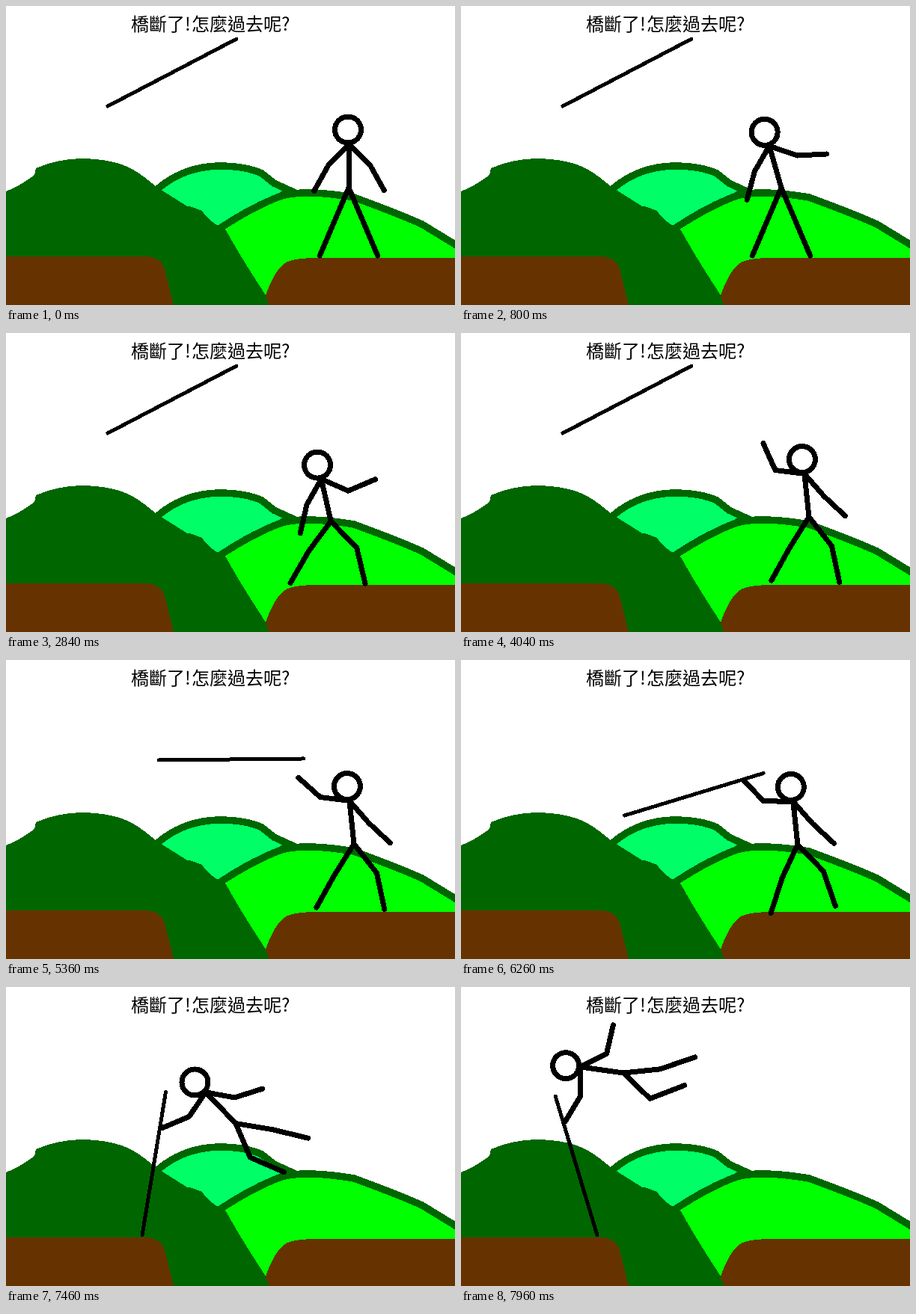
An HTML page for the animation above (8 s loop, 600 px wide and 400 px high).

```html
<!DOCTYPE html>
<html lang="zh-Hant">
<head>
<meta charset="utf-8">
<style>
  html, body { margin: 0; width: 100%; height: 100%; overflow: hidden; background: #fff; }
  svg { display: block; width: 600px; height: 400px; shape-rendering: crispEdges; }
  text { font: 100 24px "Noto Sans CJK TC", "Noto Sans CJK", sans-serif; }
  .line { fill: none; stroke: #000; stroke-width: 7; stroke-linecap: round; stroke-linejoin: round; }
  .hill { stroke: #060; stroke-width: 9.5; }
</style>
</head>
<body>
<svg viewBox="0 0 600 400">
  <path class="hill" fill="#0f6" d="M200 247Q235 215 285 214Q320 214 342 224L358 237 380 247 284 300Z"/>
  <path class="hill" fill="#0f0" d="M285 298Q330 268 368 254Q400 245 465 256Q525 278 556 292L610 325V410H285Z"/>
  <path fill="#060" d="M0 248Q20 240 38 226L40 217Q70 204 103 204Q140 205 162 215Q190 228 225 266L246 268 262 274Q270 288 294 300Q310 330 347 387L352 400H0Z"/>
  <path fill="#630" d="M0 335H188Q208 337 212 352L224 400H0ZM351 400L347 387Q360 350 376 342Q390 337 415 337H600V400Z"/>
  <text x="167" y="33">橋斷了!</text>
  <text x="248" y="33">怎麼過去呢?</text>
  <path id="pole" class="line" style="stroke-width:5"/>
  <path id="limbs" class="line"/>
  <circle id="head" class="line" r="17.5"/>
</svg>
<script>
const LOOP = 8000, POLE = 194, TORSO = 58, NECK = 19.5, ARM = 39.3, LEG = 49.4;
const RAISED = 3740, LEVEL = 5360, GRIP = 6060;

// Beckoning forearm.
const wave = t => 226 + 42 * Math.sin((t - 3925) / 232);

// Time, hip x, y, then angles clockwise from the right:
// torso, left leg, right leg, right arm, left arm (upper and lower parts)
const call = [465, 246, -96, 122, 119, 52, 78, 49, 43, 187];
const poses = [
  [0, 458, 243, -90, 113, 113, 67, 67, 44, 61, 134, 119],
  [800, 428, 243, -106, 113, 113, 67, 67, 19, -3, 120, 105],
  [2020, 392, 260, -112, 133, 121, 37, 75, -4, -138, 112, 96],
  [3440, 465, 246, -96, 122, 119, 52, 78, 44, 61, 125, 108],
  [RAISED, ...call, wave(RAISED)],
  [GRIP, ...call, wave(GRIP)],
  [6960, 397, 250, -96, 90, 68, 25, 46, 48, 42, 158, 193],
  [7960, 217, 115, -172, 44, -21, -6, -19, -27, -77, 90, 121]
];

// Lower end of the pole: time, x, y
const tips = [
  [0, 136, 134], [4340, 136, 134], [LEVEL, 204, 134],
  [GRIP, 229, 180], [6960, 182, 306], [7160, 182, 332]
];

const part = (t, from, to) => Math.min(1, Math.max(0, (t - from) / (to - from)));

function at(keys, t) {
  const i = keys.findIndex(k => k[0] > t);
  if (i < 0) return keys.at(-1).slice(1);
  const a = keys[i - 1], b = keys[i], u = part(t, a[0], b[0]);
  return a.slice(1).map((v, n) => v + (b[n + 1] - v) * u);
}

function step([x, y], deg, len) {
  const r = deg * Math.PI / 180;
  return [x + len * Math.cos(r), y + len * Math.sin(r)];
}

function limb(from, a, b, len) {
  const mid = step(from, a, len);
  return [from, mid, step(mid, b, len)];
}

// Rises to level, tips back towards the hand, then follows it.
function poleAngle(t, [x, y], hand) {
  if (t >= GRIP) return Math.atan2(hand[1] - y, hand[0] - 3 - x) * 180 / Math.PI;
  return -27.6 + 27 * part(t, 4340, LEVEL) ** 2 - 10 * part(t, LEVEL, GRIP);
}

const line = pts => "M" + pts.map(p => p.map(v => v.toFixed(2)).join(" ")).join("L");
const [pole, limbs, head] = ["pole", "limbs", "head"].map(id => document.getElementById(id));

// Poses advance every 100 ms, counted anew from each of these times.
function snap(t) {
  const start = [5160, 2540, 1820, 0].find(s => t >= s);
  return start + Math.floor((t - start) / 100) * 100;
}

function draw(t) {
  const [x, y, torso, ...bend] = at(poses, t);
  if (t >= RAISED && t < GRIP) bend[7] = wave(t);
  const hip = [x, y], neck = step(hip, torso, TORSO), face = step(neck, torso - 3, NECK);
  const parts = [hip, hip, neck, neck].map((from, i) =>
    limb(from, bend[2 * i], bend[2 * i + 1], i < 2 ? LEG : ARM));
  limbs.setAttribute("d", [[hip, neck], ...parts].map(line).join(""));
  head.setAttribute("cx", face[0]);
  head.setAttribute("cy", face[1]);

  const tip = at(tips, t), hand = parts[3][2];
  pole.setAttribute("d", line([tip, step(tip, poleAngle(t, tip, hand), POLE)]));
}

let begin;
function tick(now) {
  begin ??= now;
  draw(snap(Math.max(0, now - begin) % LOOP));
  requestAnimationFrame(tick);
}
draw(0);
requestAnimationFrame(tick);
</script>
</body>
</html>
```
